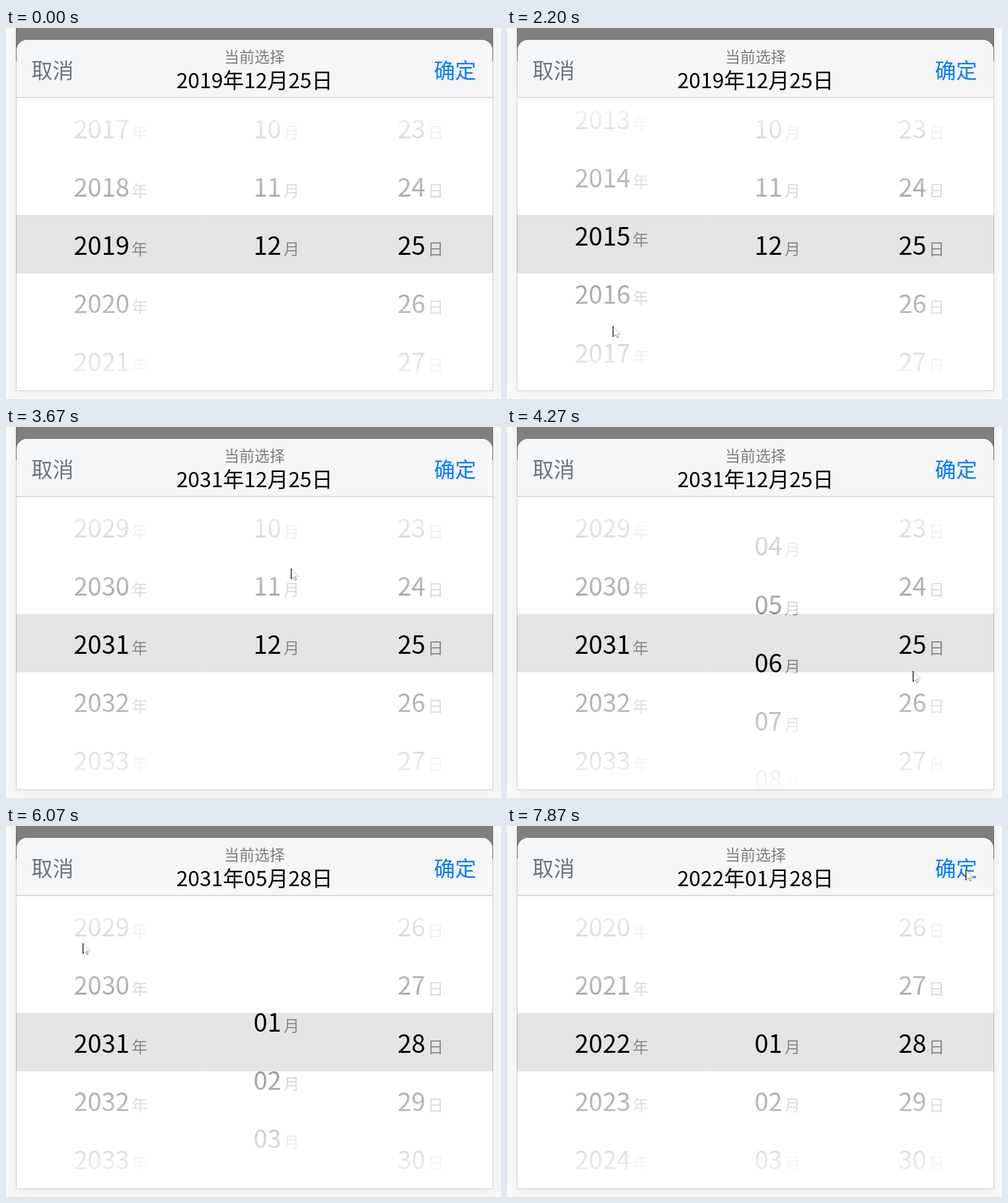
An HTML page for the animation above (8000 ms loop, 749x561 px).

```html
<!DOCTYPE html>
<html lang="zh-CN">
<head>
<meta charset="utf-8">
<title>日期选择</title>
<style>
  html, body { margin: 0; width: 100%; height: 100%; overflow: hidden; background: #f8f8f8; }
  svg { display: block; width: 749px; height: 561px; }
  text { font-family: "Noto Sans CJK SC", "Noto Sans SC", "Noto Sans CJK", "Noto Sans", sans-serif; white-space: pre; }
  .num { font-size: 38px; fill: #000; }
  .unit { font-size: 24px; fill: #888; }
</style>
</head>
<body>
<svg viewBox="0 0 749 561" xmlns="http://www.w3.org/2000/svg">
  <defs>
    <linearGradient id="fadeTop" x1="0" y1="0" x2="0" y2="1">
      <stop offset="0" stop-color="#fff" stop-opacity=".99"/>
      <stop offset="1" stop-color="#fff" stop-opacity=".61"/>
    </linearGradient>
    <linearGradient id="fadeBottom" x1="0" y1="1" x2="0" y2="0">
      <stop offset="0" stop-color="#fff" stop-opacity=".99"/>
      <stop offset="1" stop-color="#fff" stop-opacity=".61"/>
    </linearGradient>
    <clipPath id="listArea"><rect x="16" y="106" width="720" height="442"/></clipPath>
    <filter id="soft" x="-10%" y="-10%" width="120%" height="120%"><feGaussianBlur stdDeviation="8"/></filter>
  </defs>

  <rect width="749" height="561" fill="#f8f8f8"/>
  <rect x="16" y="-40" width="720" height="592" fill="#000" opacity=".06" filter="url(#soft)"/>
  <rect x="15" y="-1" width="722" height="550" fill="#cfcfcf"/>
  <rect x="16" y="-1" width="720" height="549" fill="#fff"/>
  <rect x="15" y="0" width="722" height="50" fill="#000" opacity=".5"/>
  <path d="M16 548V34a16 16 0 0 1 16-16H720a16 16 0 0 1 16 16V548Z" fill="#fff"/>

  <rect x="15" y="282.5" width="722" height="88.5" fill="#000" opacity=".106"/>
  <rect x="300" y="282.5" width="1" height="88.5" fill="#e7e7e7"/>
  <g id="wheels" clip-path="url(#listArea)"></g>
  <rect x="16" y="106" width="720" height="176.5" fill="url(#fadeTop)"/>
  <rect x="16" y="371" width="720" height="177" fill="url(#fadeBottom)"/>

  <path d="M16 105V34a16 16 0 0 1 16-16H720a16 16 0 0 1 16 16V105Z" fill="#f4f6f8"/>
  <rect x="16" y="104.5" width="720" height="1.3" fill="#c8cacd"/>
  <text x="38.5" y="76" font-size="32" fill="#6c757d">取消</text>
  <text x="647.5" y="75.5" font-size="32" fill="#007bff">确定</text>
  <text x="376" y="52" font-size="23" fill="#7c7c7c" text-anchor="middle">当前选择</text>
  <text id="date" x="376" y="90.5" font-size="31.8" fill="#000" text-anchor="middle"></text>

  <g id="cursor">
    <path d="M0 0V16L4 12.8 6.5 17.5 8.6 16.5 6.5 12H11.5Z" fill="#fff"/>
    <path d="M1 1L11.5 12H7" fill="none" stroke="#aaa" stroke-width=".8"/>
    <path d="M.5 0V16" stroke="#000" stroke-width="1.2"/>
    <path d="M1 15.5L4 12.8 6.5 17.5 8.6 16.5 6.5 12" fill="none" stroke="#333" stroke-dasharray="1.5 1"/>
  </g>
</svg>
<script>
const LOOP = 8000, FPS = 15, PITCH = 88.2, BASE = 343, GLIDE = 750;
const byId = id => document.getElementById(id);

// Smooth curve through [time, value] keys that never overshoots them
function track(keys) {
  const n = keys.length;
  const slope = keys.slice(1).map((k, i) => (k[1] - keys[i][1]) / (k[0] - keys[i][0]));
  const tangent = keys.map((_, i) => {
    if (i === 0 || i === n - 1) return 0;
    const a = slope[i - 1], b = slope[i];
    return a * b <= 0 ? 0 : 2 * a * b / (a + b);
  });
  return t => {
    if (t <= keys[0][0]) return keys[0][1];
    if (t >= keys[n - 1][0]) return keys[n - 1][1];
    let i = 0;
    while (t > keys[i + 1][0]) i++;
    const h = keys[i + 1][0] - keys[i][0], u = (t - keys[i][0]) / h, v = 1 - u;
    return v * v * ((1 + 2 * u) * keys[i][1] + u * h * tangent[i])
      + u * u * ((3 - 2 * u) * keys[i + 1][1] - v * h * tangent[i + 1]);
  };
}

// Turning points of the pointer: time, x, y
const path = [
  [600, 60, 575], [1340, 152, 92], [1600, 150, 112], [2200, 160, 451], [2270, 161, 460],
  [2530, 190, 300], [2867, 248, 263], [3200, 391, 280], [3530, 431, 214], [3680, 431, 214],
  [3880, 425, 300], [4267, 614, 369], [4530, 600, 495], [4600, 600, 495], [4750, 595, 400],
  [4933, 586, 337], [5500, 430, 185], [5690, 405, 275], [6067, 116, 177], [6270, 105, 144],
  [6430, 140, 300], [7070, 236, 144], [7470, 752, 68], [7640, 752, 68], [7867, 694, 66]
];
const cursorX = track(path.map(k => [k[0], k[1]]));
const cursorY = track(path.map(k => [k[0], k[2]]));

// A flick follows the pointer from grab to drop, then glides to a value;
// the title takes that value at the time given by shown
const wheels = [
  { x: 102.5, unitX: 190, unit: "年", min: 1900, max: 2100, initial: 2019, flicks: [
    { grab: 1600, drop: 2530, to: 2031, shown: 2600 },
    { grab: 6270, drop: 6430, to: 2022, shown: 7180 }] },
  { x: 374.5, unitX: 420, unit: "月", min: 1, max: 12, initial: 12, flicks: [
    { grab: 3680, drop: 3880, to: 5, shown: 4620 },
    { grab: 5500, drop: 5690, to: 1, shown: 6430 }] },
  { x: 592.5, unitX: 638, unit: "日", min: 1, max: 31, initial: 25, flicks: [
    { grab: 4600, drop: 4750, to: 28, shown: 5490 }] }
];

function position(w, t) {
  let pos = w.initial;
  for (const f of w.flicks) {
    if (t < f.grab) break;
    const dragged = pos - (cursorY(Math.min(t, f.drop)) - cursorY(f.grab)) / PITCH;
    const u = Math.min(1, Math.max(0, (t - f.drop) / GLIDE));
    pos = f.to + (dragged - f.to) * (1 - u) ** 3;
  }
  return pos;
}

const pad = value => String(value).padStart(2, "0");
const chosen = (w, t) => w.flicks.reduce((value, f) => t >= f.shown ? f.to : value, w.initial);

function addText(parent, cls, x) {
  const el = document.createElementNS("http://www.w3.org/2000/svg", "text");
  el.setAttribute("class", cls);
  el.setAttribute("x", x);
  return parent.appendChild(el);
}

for (const w of wheels) {
  w.rows = Array.from({ length: 7 }, () => ({
    num: addText(byId("wheels"), "num", w.x),
    unit: addText(byId("wheels"), "unit", w.unitX)
  }));
}

function drawWheel(w, t) {
  const pos = position(w, t), first = Math.round(pos) - 3;
  w.rows.forEach((row, i) => {
    const value = first + i, visible = value >= w.min && value <= w.max;
    const y = BASE + (value - pos) * PITCH;
    row.num.textContent = visible ? pad(value) : "";
    row.unit.textContent = visible ? w.unit : "";
    row.num.setAttribute("y", y);
    row.unit.setAttribute("y", y);
  });
}

function draw(time) {
  const t = Math.floor((time % LOOP) * FPS / 1000 + 0.05) * 1000 / FPS;
  wheels.forEach(w => drawWheel(w, t));
  byId("date").textContent = wheels.map(w => pad(chosen(w, t)) + w.unit).join("");
  byId("cursor").setAttribute("transform", `translate(${Math.round(cursorX(t))} ${Math.round(cursorY(t))})`);
}

const start = performance.now();
function tick() {
  draw(performance.now() - start);
  requestAnimationFrame(tick);
}
tick();
</script>
</body>
</html>
```
